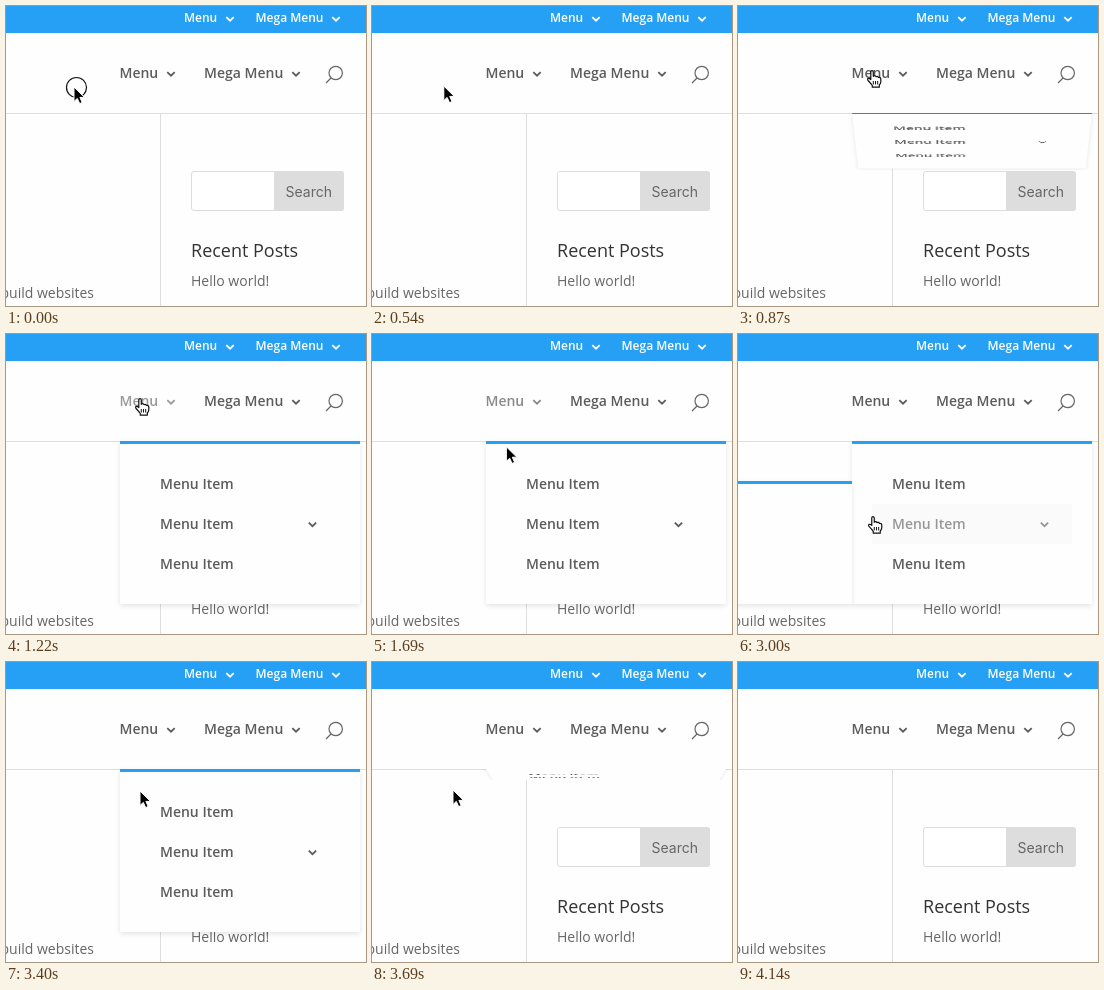
Recreate the animation shown at these times as an HTML page. Size 360 by 300 pixels, loop 5360 ms.

```html
<!DOCTYPE html>
<html lang="en">
<head>
<meta charset="utf-8">
<title>Dropdown menu</title>
<style>
  html, body { margin: 0; width: 100%; height: 100%; overflow: hidden; background: #fefefe; }
  svg { position: absolute; left: 0; top: 0; overflow: visible; }
  text { font: 400 14px "Open Sans", sans-serif; fill: #666; }
  .bold { font-weight: 600; fill: #5c5c5c; }
  .bar text { font-size: 12px; font-weight: 600; fill: #fff; }
  .bar use { stroke: #fff; }
  use { fill: none; stroke: #5c5c5c; stroke-width: 1.8; }
  .panel {
    position: absolute; box-sizing: border-box; width: 240px;
    background: #fefefe; border-top: 3px solid #26a0f5;
    box-shadow: 0 2px 5px rgba(0, 0, 0, .1); transform-origin: 50% 0;
  }
  #main { left: 114px; top: 107px; height: 163px; }
  #sub { left: -126px; top: 147px; height: 123px; }
</style>
</head>
<body>
<svg width="360" height="300">
  <defs><path id="chevron" d="M-3.7 -1.8L0 1.7L3.7 -1.8"/></defs>
  <g class="bar">
    <rect width="360" height="27" fill="#26a0f5"/>
    <text x="178" y="16">Menu</text><use href="#chevron" x="224" y="13"/>
    <text x="249.500" y="16">Mega Menu</text><use href="#chevron" x="330" y="13"/>
  </g>
  <path d="M0 107.500H360M154.500 108V300" stroke="#dedede"/>
  <g id="menuLink">
    <text class="bold" x="113.500" y="72">Menu</text><use href="#chevron" x="165" y="68"/>
  </g>
  <text class="bold" x="198" y="72">Mega Menu</text><use href="#chevron" x="290" y="68"/>
  <g fill="none" stroke="#666" stroke-width="1.2">
    <circle cx="329.700" cy="67" r="6.700"/><path d="M325 72L320 77"/>
  </g>
  <rect x="185.500" y="165.500" width="152" height="39" rx="2.500" fill="#fff" stroke="#ddd"/>
  <path d="M268 165H335Q338 165 338 168V202Q338 205 335 205H268Z" fill="#ddd"/>
  <text x="279.500" y="191" style="font-family: Inter, sans-serif">Search</text>
  <text x="185" y="251" style="font-size: 18px; fill: #333">Recent Posts</text>
  <text x="185" y="280">Hello world!</text>
  <text x="88" y="292" text-anchor="end">build websites</text>
</svg>

<div class="panel" id="main">
  <svg width="240" height="160">
    <rect id="highlight" x="20" y="60" width="200" height="40" fill="#000"/>
    <text class="bold" x="40" y="45">Menu Item</text>
    <g id="parentItem">
      <text class="bold" x="40" y="85">Menu Item</text><use href="#chevron" x="192.500" y="80.500"/>
    </g>
    <text class="bold" x="40" y="125">Menu Item</text>
  </svg>
</div>
<div class="panel" id="sub"></div>

<svg width="360" height="300">
  <circle id="ring" cx="70.500" cy="81.500" r="10" fill="none" stroke="#111" stroke-width="1.200"/>
  <path id="arrow" fill="#000" stroke="#fff" d="M0 0V14.500L3.300 11.400L5.700 16.600L8.200 15.500L5.900 10.400H10.500Z"/>
  <g id="hand" stroke="#111" stroke-width="1.200" fill="none" stroke-linejoin="round">
    <path fill="#fff" d="M-1.200 9V2Q-1.200 .6 0 .6T1.300 2V6.200Q3.500 5 4 6.700Q6 5.800 6.400 7.500Q9 7 8.800 9.500V12Q8.500 14 7.300 15V17.200H.3V15.500Q-1 13.500 -4 10.500Q-5 9 -3.600 8.300Q-2.300 8.200 -1.200 9.500Z"/>
    <path d="M1.300 11V14.500M3.500 11V14.500M5.700 11V14.500" stroke-width="1"/>
  </g>
</svg>

<script>
const LOOP = 5360;
const el = id => document.getElementById(id);

// Runs of evenly spaced picture changes: [first, last, count]. The picture rests between them.
const RUNS = [
  [60, 60, 1], [480, 980, 10], [1040, 1040, 1], [1220, 1220, 1], [1460, 1980, 10],
  [2040, 2160, 2], [2460, 2580, 3], [3000, 3510, 9], [3570, 4080, 10], [4140, 4140, 1],
];

// Cursor path: [time, x, y]
const PATH = [
  [480, 68, 81], [860, 134, 64], [1420, 134, 64], [1930, 135, 193], [2400, 135, 193],
  [2580, 135, 184], [2950, 135, 184], [3380, 134, 129], [3510, 134, 129],
  [3683, 81, 128], [3710, 81, 128], [4080, 76, 264],
];

function heldTime(t) {
  let held = 0;
  for (const [first, last, count] of RUNS) {
    if (t < first) break;
    const step = (last - first) / (count - 1) || 1;
    held = Math.min(last, first + Math.floor((t - first) / step) * step);
  }
  return held;
}

function ramp(t, from, to) {
  const u = Math.min(1, Math.max(0, (t - from) / (to - from)));
  return u * u * (3 - 2 * u);
}

const pulse = (t, inFrom, inTo, outFrom, outTo) => ramp(t, inFrom, inTo) - ramp(t, outFrom, outTo);

function cursorAt(t) {
  let [, x, y] = PATH[0];
  for (let i = 1; i < PATH.length; i++) {
    const [from, x0, y0] = PATH[i - 1], [to, x1, y1] = PATH[i];
    const u = ramp(t, from, to);
    x += (x1 - x0) * u;
    y += (y1 - y0) * u;
  }
  return [x, y];
}

function flip(id, open) {
  const angle = 90 * (1 - open), { style } = el(id);
  style.visibility = angle > 89 ? "hidden" : "visible";
  style.transform = angle ? `perspective(2700px) rotateX(${-angle}deg)` : "none";
  style.borderTopColor = angle > 50 ? "#7b717b" : "#26a0f5";
}

function show(id, visible) {
  el(id).style.display = visible ? "" : "none";
}

function draw(now) {
  const t = heldTime(now % LOOP);
  flip("main", pulse(t, 795, 1030, 3509, 3709));
  flip("sub", pulse(t, 1740, 1980, 3150, 3380));

  const itemHover = pulse(t, 1760, 2160, 3080, 3380);
  el("menuLink").style.opacity = 1 - .38 * pulse(t, 860, 1000, 1500, 1900);
  el("parentItem").style.opacity = 1 - .38 * itemHover;
  el("highlight").style.opacity = .015 * itemHover;

  const [x, y] = cursorAt(t);
  const overLink = x > 113 && (y < 100 || y > 131);
  const present = t < 4140;
  show("ring", t < 60);
  show("arrow", present && !overLink);
  show("hand", present && overLink);
  for (const id of ["arrow", "hand"]) el(id).setAttribute("transform", `translate(${x} ${y})`);
}

function tick() {
  draw(performance.now());
  requestAnimationFrame(tick);
}
tick();
</script>
</body>
</html>
```
